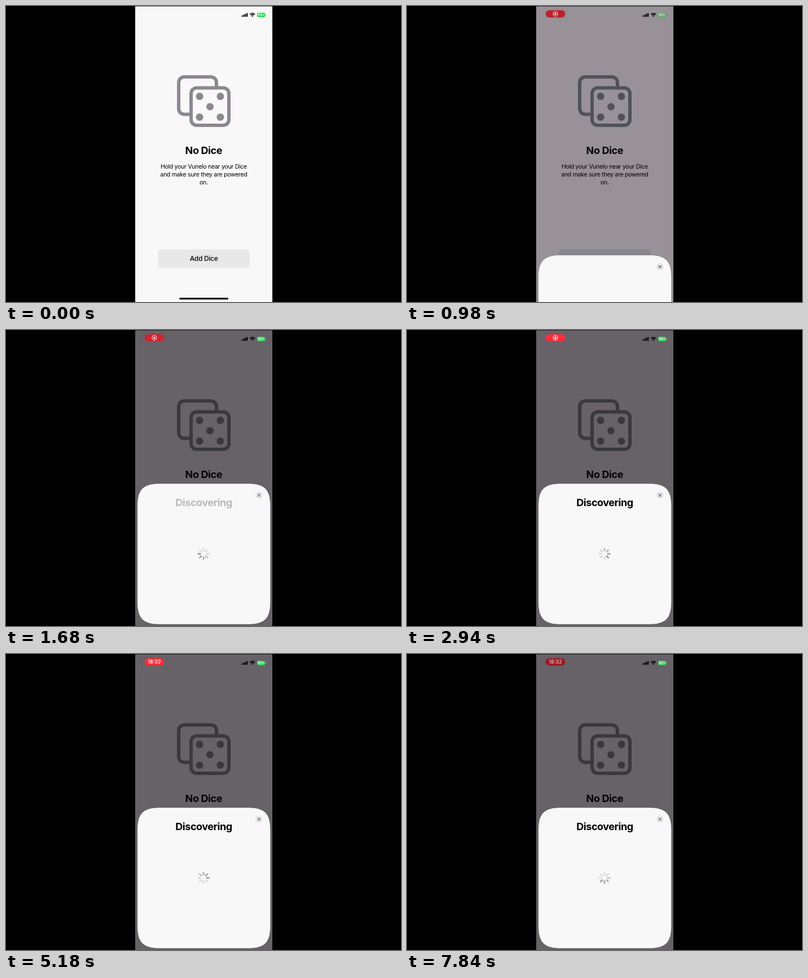
Recreate the animation shown at these times as an HTML page with a canvas. Size 700 px wide and 526 px high, loop 8.84 s.

```html
<!DOCTYPE html>
<html lang="en">
<head>
<meta charset="utf-8">
<title>No Dice</title>
<style>
html, body { margin: 0; width: 100%; height: 100%; overflow: hidden; background: #000; }
canvas { display: block; }
</style>
</head>
<body>
<canvas id="stage" width="700" height="526"></canvas>
<script>
const ctx = document.getElementById('stage').getContext('2d');
const LOOP = 8840, STEP = 140, LAST = 56;
const FONT = 'Inter, Roboto, sans-serif';
const TAU = Math.PI * 2;

// Keyframes: step number, then one value or a list of channels.
const PAGE = [[5, [248, 248, 248]], [6, [212, 208, 212]], [7, [152, 145, 152]], [8, [116, 109, 117]], [9, [103, 97, 104]]];
const DICE = [[5, [141, 135, 143]], [6, [118, 115, 121]], [7, [80, 82, 87]], [8, [63, 63, 66]], [9, [57, 57, 59]]];
const BUTTON = [[5, [232, 232, 232]], [6, [196, 195, 198]], [7, [135, 134, 141]], [9, [96, 92, 98]]];
const GREEN = [[5, [50, 217, 92]], [7, [86, 168, 98]], [9, [62, 190, 94]], [12, [57, 208, 95]]];
const SHEET_TOP = [[5, 526], [6, 518], [7, 443], [8, 343], [9, 294], [10, 278], [11, 274], [12, 273.3]];
const PILL_ALPHA = [[0, 0], [1, 0.25], [2, 0.55], [3, 0.85], [4, 1]];
const PILL_LEVEL = [[5, 1], [7, 0.74], [9, 0.62], [12, 0.82], [13, 1], [22, 1], [25, 0.6], [28, 0.83], [29, 1], [53, 1], [56, 0.61]];
const CLOCK = [[24, 0], [26, 1]];
const HEADING = [[11, 0], [12, 0.25], [13, 0.6], [14, 0.9], [15, 1]];
const SPOKES = [0.42, 0.36, 0.3, 0.24, 0.15, 0.13, 0.13, 0.13];

function key(n, keys) {
  const i = keys.findIndex(k => k[0] >= n);
  if (i === 0) return keys[0][1];
  if (i < 0) return keys[keys.length - 1][1];
  const [n0, a] = keys[i - 1], [n1, b] = keys[i];
  const p = (n - n0) / (n1 - n0);
  return Array.isArray(a) ? a.map((v, j) => v + (b[j] - v) * p) : a + (b - a) * p;
}

const rgb = c => `rgb(${c.map(Math.round).join(',')})`;

function box(x, y, w, h, r, fill) {
  ctx.beginPath();
  ctx.roundRect(x, y, w, h, r);
  ctx.fillStyle = fill;
  ctx.fill();
}

function dot(x, y, r, fill) {
  ctx.beginPath();
  ctx.arc(x, y, r, 0, TAU);
  ctx.fillStyle = fill;
  ctx.fill();
}

function text(str, x, y, size, weight, color, spacing = 0) {
  ctx.font = `${weight} ${size}px ${FONT}`;
  ctx.letterSpacing = spacing + 'px';
  ctx.textAlign = 'center';
  ctx.fillStyle = color;
  ctx.fillText(str, x, y);
}

function line(x1, y1, x2, y2, width, color) {
  ctx.beginPath();
  ctx.moveTo(x1, y1);
  ctx.lineTo(x2, y2);
  ctx.lineWidth = width;
  ctx.lineCap = 'round';
  ctx.strokeStyle = color;
  ctx.stroke();
}

function die(x, y, ink, paper) {
  box(x, y, 73, 72.5, 13, ink);
  box(x + 6, y + 6, 61, 60.5, 7, paper);
}

function drawDice(ink, paper) {
  die(303, 123, ink, paper);
  die(325, 142.5, ink, paper);
  for (const [dx, dy] of [[-1, -1], [1, -1], [0, 0], [-1, 1], [1, 1]]) {
    dot(361.5 + dx * 18.4, 179 + dy * 18.4, 6.5, ink);
  }
}

function drawStatus(green) {
  for (let i = 0; i < 4; i++) {
    const h = 2.6 + i * 1.4;
    box(417.8 + i * 2.8, 19.2 - h, 2, h, 0.6, '#000');
  }
  ctx.lineCap = 'butt';
  ctx.strokeStyle = '#000';
  ctx.lineWidth = 1.5;
  for (const r of [6.3, 3.9]) {
    ctx.beginPath();
    ctx.arc(436.7, 19.2, r, -Math.PI * 0.75, -Math.PI * 0.25);
    ctx.stroke();
  }
  ctx.beginPath();
  ctx.moveTo(436.7, 19.3);
  ctx.arc(436.7, 19.2, 2.2, -Math.PI * 0.75, -Math.PI * 0.25);
  ctx.fillStyle = '#000';
  ctx.fill();
  box(445, 12, 14.3, 8, 2.4, green);
  box(459.9, 14.7, 1, 2.6, 0.5, green);
  text('93+', 452.2, 18.4, 6.2, 600, '#fff');
}

function drawPill(n) {
  const level = key(n, PILL_LEVEL), alpha = key(n, PILL_ALPHA), clock = key(n, CLOCK);
  const shine = 0.4 + 0.6 * level;
  ctx.globalAlpha = alpha;
  box(245.5, 7.5, 35, 13, 6.5, rgb([253 * level, 45 * level, 58 * level]));
  ctx.globalAlpha = alpha * shine * (1 - clock);
  ctx.beginPath();
  ctx.arc(262.9, 13.9, 4.1, 0, TAU);
  ctx.lineWidth = 1;
  ctx.strokeStyle = '#fff';
  ctx.stroke();
  dot(262.9, 13.9, 2, '#fff');
  ctx.globalAlpha = alpha * shine * clock;
  text('18:32', 262.9, 17.2, 9, 500, '#fff');
  ctx.globalAlpha = 1;
}

function sheetShape(x, y, w, h) {
  const r = 40, c = 10, X = x + w, Y = y + h;
  ctx.beginPath();
  ctx.moveTo(x + r, y);
  ctx.lineTo(X - r, y);
  ctx.bezierCurveTo(X - c, y, X, y + c, X, y + r);
  ctx.lineTo(X, Y - r);
  ctx.bezierCurveTo(X, Y - c, X - c, Y, X - r, Y);
  ctx.lineTo(x + r, Y);
  ctx.bezierCurveTo(x + c, Y, x, Y - c, x, Y - r);
  ctx.lineTo(x, y + r);
  ctx.bezierCurveTo(x, y + c, x + c, y, x + r, y);
  ctx.fillStyle = '#f8f8f8';
  ctx.fill();
}

function drawSpinner(n, y) {
  const head = Math.floor(n * 10 / 7 + 3.5) % 8;
  for (let i = 0; i < 8; i++) {
    const a = i * TAU / 8, age = (head - i + 8) % 8;
    const cos = Math.cos(a), sin = Math.sin(a);
    line(350 + cos * 5.6, y + sin * 5.6, 350 + cos * 9.5, y + sin * 9.5, 2.7, `rgba(20,18,30,${SPOKES[age]})`);
  }
}

function drawSheet(n) {
  const top = key(n, SHEET_TOP);
  if (top >= 526) return;
  sheetShape(233, top, 235.3, 249.4);
  const cx = 448.4, cy = top + 20.2;
  dot(cx, cy, 6.5, '#e9e6ec');
  line(cx - 2.3, cy - 2.3, cx + 2.3, cy + 2.3, 1.2, '#716d75');
  line(cx - 2.3, cy + 2.3, cx + 2.3, cy - 2.3, 1.2, '#716d75');
  ctx.globalAlpha = key(n, HEADING);
  text('Discovering', 350.5, top + 39.4, 18, 700, '#000', -0.45);
  ctx.globalAlpha = 1;
  drawSpinner(n, top + 124.5);
}

function draw(t) {
  const n = Math.min(Math.floor(t / STEP), LAST);
  const page = rgb(key(n, PAGE));
  ctx.fillStyle = '#000';
  ctx.fillRect(0, 0, 700, 526);
  ctx.save();
  ctx.beginPath();
  ctx.rect(229, 0, 243, 526);
  ctx.clip();
  ctx.fillStyle = page;
  ctx.fillRect(229, 0.6, 243, 526);
  drawStatus(rgb(key(n, GREEN)));
  drawPill(n);
  drawDice(rgb(key(n, DICE)), page);
  text('No Dice', 350.3, 263, 18, 700, '#000', -0.4);
  const lines = ['Hold your Vunelo near your Dice', 'and make sure they are powered', 'on.'];
  lines.forEach((s, i) => text(s, 350.4, 289.2 + i * 13.8, 10.5, 400, '#000', -0.27));
  box(269, 432.5, 163, 32.7, 6, rgb(key(n, BUTTON)));
  text('Add Dice', 350.6, 453, 11.8, 500, '#000', -0.2);
  box(307, 518.4, 87, 3.2, 1.6, '#000');
  drawSheet(n);
  ctx.restore();
}

const start = performance.now();
function tick() {
  draw((performance.now() - start) % LOOP);
  requestAnimationFrame(tick);
}
tick();
</script>
</body>
</html>
```
